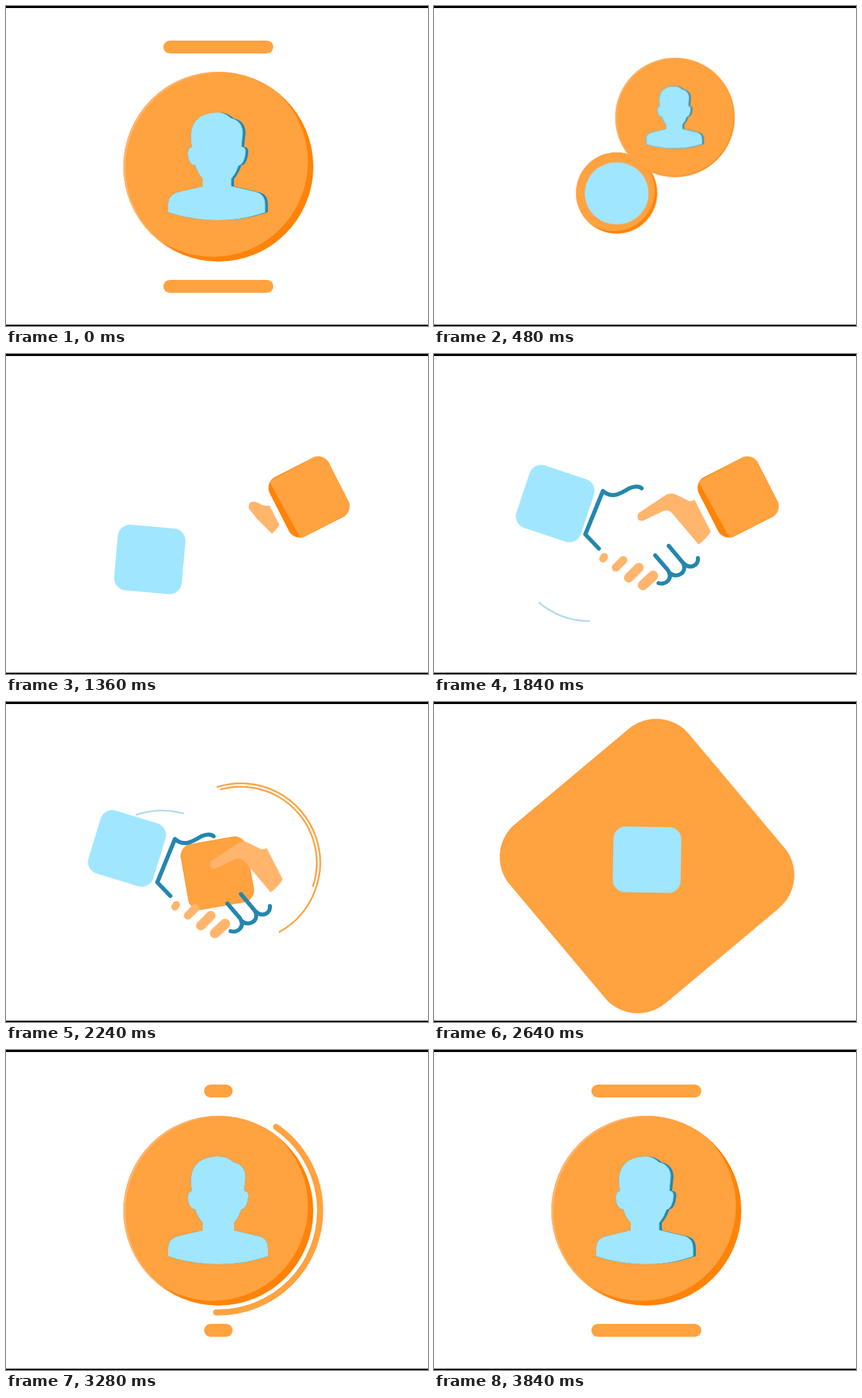
Write an HTML page without scripts that moves like this. It is 622 by 472 pixels and loops after 3.92 s.

```html
<!DOCTYPE html>
<html lang="en">
<head>
<meta charset="utf-8">
<title>Handshake loop</title>
<style>
:root { --orange: #ffa240; --dark: #ff8308; --pale: #ffb56c; --blue: #a0e6ff; --teal: #2487ae; }
html, body { margin: 0; width: 100%; height: 100%; overflow: hidden; background: #fff; }
.stage { position: relative; width: 622px; height: 472px; overflow: hidden; background: #fff; }
.stage::after { content: ""; position: absolute; inset: 0; z-index: 9; border: solid #000; border-width: 3px 0 2.5px; }
.stage *, .coin::before, .coin::after { animation: 3920ms linear infinite; }
.coin, .mover, .mover div, .scene, .bar { position: absolute; }
.coin::before, .coin::after { content: ""; position: absolute; inset: 0; border-radius: inherit; }
.coin::before { background: var(--orange); }
.coin { background: var(--dark); overflow: hidden; }

/* Large coin that becomes the orange cuff and then the backdrop */
.main { left: 173px; top: 97px; width: 280px; height: 280px; z-index: 1; }
.stage .main { animation-name: main; }
.main::before { animation-name: main-face !important; }
.main::after { box-shadow: inset 3px 1px 0 var(--pale); animation-name: rim !important; }
@keyframes main {
  0%, 6.12% { transform: none; border-radius: 140px; animation-timing-function: ease-in; }
  10.2% { transform: translate(22px, -32px) scale(.8); }
  14.29% { transform: translate(62px, -112px) scale(.46); animation-timing-function: ease-out; }
  16.33% { transform: translate(72px, -157px) scale(.46); animation-timing-function: ease-in-out; }
  22.45% { transform: translate(95px, -81.5px) scale(.457, .44); border-radius: 140px; }
  26.53% { transform: translate(139px, -68px) scale(.45); border-radius: 140px; }
  30.61% { transform: translate(135px, -58px) rotate(-12deg) scale(.41); border-radius: 100px; }
  34.69% { transform: translate(133.5px, -26px) rotate(-27deg) scale(.35); border-radius: 51.5px; }
  53.06% { transform: translate(136px, -26px) rotate(-27deg) scale(.35); border-radius: 51.5px; animation-timing-function: ease-in-out; }
  57.14% { transform: translate(-1.5px, 15.5px) rotate(-10deg) scale(.35); animation-timing-function: ease-in-out; }
  67.35% { transform: translate(1px, 5px) rotate(-40deg) scale(1.23); border-radius: 51.5px; }
  71.43% { transform: translate(1px, 5px) rotate(-36deg) scale(1.25); border-radius: 54px; animation-timing-function: ease-in-out; }
  77.55% { transform: scale(.97); border-radius: 140px; }
  79.59%, 100% { transform: none; border-radius: 140px; }
}
@keyframes main-face {
  0%, 6.12% { transform: translate(-8px, -7px); border-radius: 140px; }
  14.29%, 26.53% { transform: none; border-radius: 140px; }
  34.69%, 52% { transform: translateX(26px) rotate(-2deg); border-radius: 0; }
  57.14%, 75% { transform: none; border-radius: 0; }
  77.55% { transform: none; border-radius: 140px; }
  81.63%, 100% { transform: translate(-8px, -7px); border-radius: 140px; }
}
@keyframes rim { 0%, 26.53% { opacity: 1 } 30.61%, 77.55% { opacity: 0 } 81.63%, 100% { opacity: 1 } }

.person { position: absolute; inset: 0; z-index: 1; }
.stage .person { animation-name: person; }
.stage .front { animation-name: front; }
@keyframes person {
  0%, 6.12% { transform: none; }
  14.29%, 27% { transform: scale(.9); }
  31%, 72.45% { transform: scale(0); animation-timing-function: ease-out; }
  77.55% { transform: scale(1.05); }
  79.59%, 100% { transform: none; }
}
@keyframes front { 0%, 28% { transform: translateX(-4.5px) } 32%, 85.71% { transform: none } 91.84%, 100% { transform: translateX(-4.5px) } }

/* Small coin that becomes the blue cuff */
.mover { left: 313px; top: 237px; }
.stage .mover { animation-name: mover; }
.mover .coin { left: -63px; top: -63px; width: 126px; height: 126px; border-radius: 50%; }
.mover .coin::before { transform: translate(-4px, -4px); }
.mover .coin { animation-name: ring !important; }
.mover .tile { left: -50px; top: -48.5px; width: 100px; height: 97px; background: var(--blue); animation-name: tile; }
@keyframes mover {
  0%, 6.12% { transform: none; z-index: 0; animation-timing-function: ease-in; }
  14.29% { transform: translate(-70px, 62px); animation-timing-function: ease-out; }
  17.35% { transform: translate(-115px, 98px); animation-timing-function: ease-in-out; }
  22.45% { transform: translate(-93px, 86px); z-index: 0; }
  28.57% { transform: translate(-98px, 78px); z-index: 3; }
  34.69% { transform: translate(-101px, 65.5px) rotate(5deg); animation-timing-function: ease-in-out; }
  42.86% { transform: translate(-134px, -15px) rotate(19deg); }
  57.14% { transform: translate(-134.5px, -21.5px) rotate(17deg); animation-timing-function: ease-in-out; }
  67.35% { transform: translate(1px, -5px) rotate(1deg); }
  77.55%, 99% { transform: none; z-index: 3; }
  100% { transform: none; z-index: 0; }
}
@keyframes ring { 0%, 6.12% { transform: scale(.8) } 14.29%, 26.53% { transform: none } 31.63% { transform: scale(.7) } 32.65%, 100% { transform: scale(0) } }
@keyframes tile {
  0%, 26.53% { transform: scale(.94); border-radius: 50px; }
  34.69%, 71.43% { transform: none; border-radius: 18px; }
  75.51% { transform: scale(.8); border-radius: 40px; }
  77.55%, 99.9% { transform: scale(0); border-radius: 50px; }
  100% { transform: scale(.94); border-radius: 50px; }
}

.bar { left: 232px; width: 162px; height: 19px; border-radius: 10px; background: var(--orange); }
.stage .bar { animation-name: bar; }
@keyframes bar {
  0%, 1% { left: 232px; width: 162px; }
  8.16%, 81.63% { left: 313px; width: 0; }
  83.67% { left: 292.5px; width: 41px; }
  87.76%, 100% { left: 232px; width: 162px; }
}

.scene { inset: 0; z-index: 2; fill: none; }
/* The hand starts as a stub at the wrist and stretches out its thumb */
.stage .palm { fill: var(--pale); transform-origin: 398px 240px; animation-name: palm, reach; }
@keyframes palm {
  0%, 31.6% { transform: scale(0); }
  34.69%, 57.14% { transform: none; }
  61.22%, 100% { transform: scale(0); }
}
@keyframes reach {
  0%, 34.69% { d: path("M358 226L358 224Q358 217 367 218L373 220Q381 226 388 223L403 252Q399 259 392 265L372 245Q369 242 367 239L363 234Q358 229 358 226Z"); }
  40.82%, 100% { d: path("M301 235L340 209Q349 203 358 208L372 215Q378 219 384 215L408 262Q401 273 390 281L352 236Q346 228 337 232L308 246Q297 247 301 235Z"); }
}
.fingers { stroke: var(--pale); stroke-linecap: round; }
.fingers path { transform-box: fill-box; transform-origin: center; animation-name: finger; }
@keyframes finger { 0%, 38% { transform: scale(0) } 44.9%, 57.14% { transform: none } 61.22%, 100% { transform: scale(0) } }
.outline { stroke: var(--teal); stroke-width: 6; stroke-linecap: round; stroke-linejoin: round; }
.outline path { stroke-dasharray: 1 2; animation-name: draw; }
@keyframes draw {
  0%, 36.7% { stroke-dashoffset: 1; opacity: 0; }
  36.8% { stroke-dashoffset: 1; opacity: 1; }
  46.94%, 57.14% { stroke-dashoffset: 0; }
  61.2% { stroke-dashoffset: -1; opacity: 1; }
  61.3%, 100% { stroke-dashoffset: -1; opacity: 0; }
}
.arc { stroke: var(--orange); stroke-width: 2.5; }
.stage .sweep { animation-name: sweep; }
@keyframes sweep {
  0%, 48.98% { stroke-dasharray: 0 360; stroke-dashoffset: 0; }
  57.14% { stroke-dasharray: var(--len) 360; stroke-dashoffset: 0; }
  61.22%, 100% { stroke-dasharray: 0 360; stroke-dashoffset: -200; }
}
.stage .trail { stroke: #b3dcec; animation-name: trail; }
@keyframes trail {
  0%, 44.9% { stroke-dasharray: 0 360; stroke-dashoffset: 0; }
  51.02% { stroke-dasharray: 120 360; stroke-dashoffset: 0; }
  57.14% { stroke-dasharray: 36 360; stroke-dashoffset: -160; }
  59.18%, 100% { stroke-dasharray: 0 360; stroke-dashoffset: -200; }
}
.stage .orbit { stroke-width: 9; stroke-linecap: round; animation-name: orbit; }
@keyframes orbit {
  0%, 77.5% { stroke-dasharray: 0 360; stroke-dashoffset: 0; opacity: 0; }
  77.55% { stroke-dasharray: 0 360; stroke-dashoffset: 0; opacity: 1; }
  81.63% { stroke-dasharray: 110 360; stroke-dashoffset: 0; }
  83.67% { stroke-dasharray: 149 360; stroke-dashoffset: -32; }
  85.6% { stroke-dasharray: 0 360; stroke-dashoffset: -200; opacity: 1; }
  85.7%, 100% { stroke-dasharray: 0 360; stroke-dashoffset: -200; opacity: 0; }
}
</style>
</head>
<body>
<div class="stage">
  <div class="bar" style="top:51px"></div>
  <div class="bar" style="top:403.5px"></div>

  <div class="mover"><div class="coin"></div><div class="tile"></div></div>

  <div class="coin main">
    <svg class="person" width="280" height="280" viewBox="173 97 280 280">
      <defs>
        <path id="bust" d="M239 304V293Q239 279 252 275L290 266V255Q282 246 279 235C272 235 268 226 268 217Q268 209 274 208C272 196 272 186 275 178C281 162 297 157 313 157C325 157 332 162 336 166C347 168 353 176 353 187L351 208C358 208 358 214 356 223Q353 235 347 235Q343 247 336 255V266L374 275Q386 278 386 293V304C360 313 335 316 313 316S260 312 239 304Z"/>
        <clipPath id="bust-clip"><use href="#bust"/></clipPath>
      </defs>
      <use href="#bust" fill="#2487ae"/>
      <g clip-path="url(#bust-clip)">
        <g class="front"><use href="#bust" fill="#a0e6ff" stroke="#a0e6ff"/></g>
      </g>
    </svg>
  </div>

  <svg class="scene" width="622" height="472" viewBox="0 0 622 472">
    <g class="arc">
      <circle class="sweep" style="--len:170" cx="346" cy="237" r="117" pathLength="360" transform="rotate(-109 346 237)"/>
      <circle class="sweep" style="--len:125" cx="346" cy="237" r="112" pathLength="360" transform="rotate(-107 346 237)"/>
      <circle class="trail" cx="230" cy="277" r="117" pathLength="360" transform="rotate(90 230 277)"/>
      <circle class="orbit" cx="313" cy="237" r="150" pathLength="360" transform="rotate(-90 313 237)"/>
    </g>
    <path class="palm"/>
    <g class="fingers">
      <path stroke-width="11" d="M249 302l2-3"/>
      <path stroke-width="12" d="M268 315l11-11"/>
      <path stroke-width="14" d="M287 330l15-15"/>
      <path stroke-width="15" d="M308 341l15-14"/>
    </g>
    <g class="outline">
      <path pathLength="1" d="M243 287L223 266L249 202C262 214 275 206 288 198Q300 193 306 198"/>
      <path pathLength="1" d="M326 297L345 319C353 332 341 341 331 338"/>
      <path pathLength="1" d="M346 283L367 308C374 322 359 332 347 323"/>
      <path pathLength="1" d="M368 309C378 318 390 312 389 301"/>
    </g>
  </svg>
</div>
</body>
</html>
```
